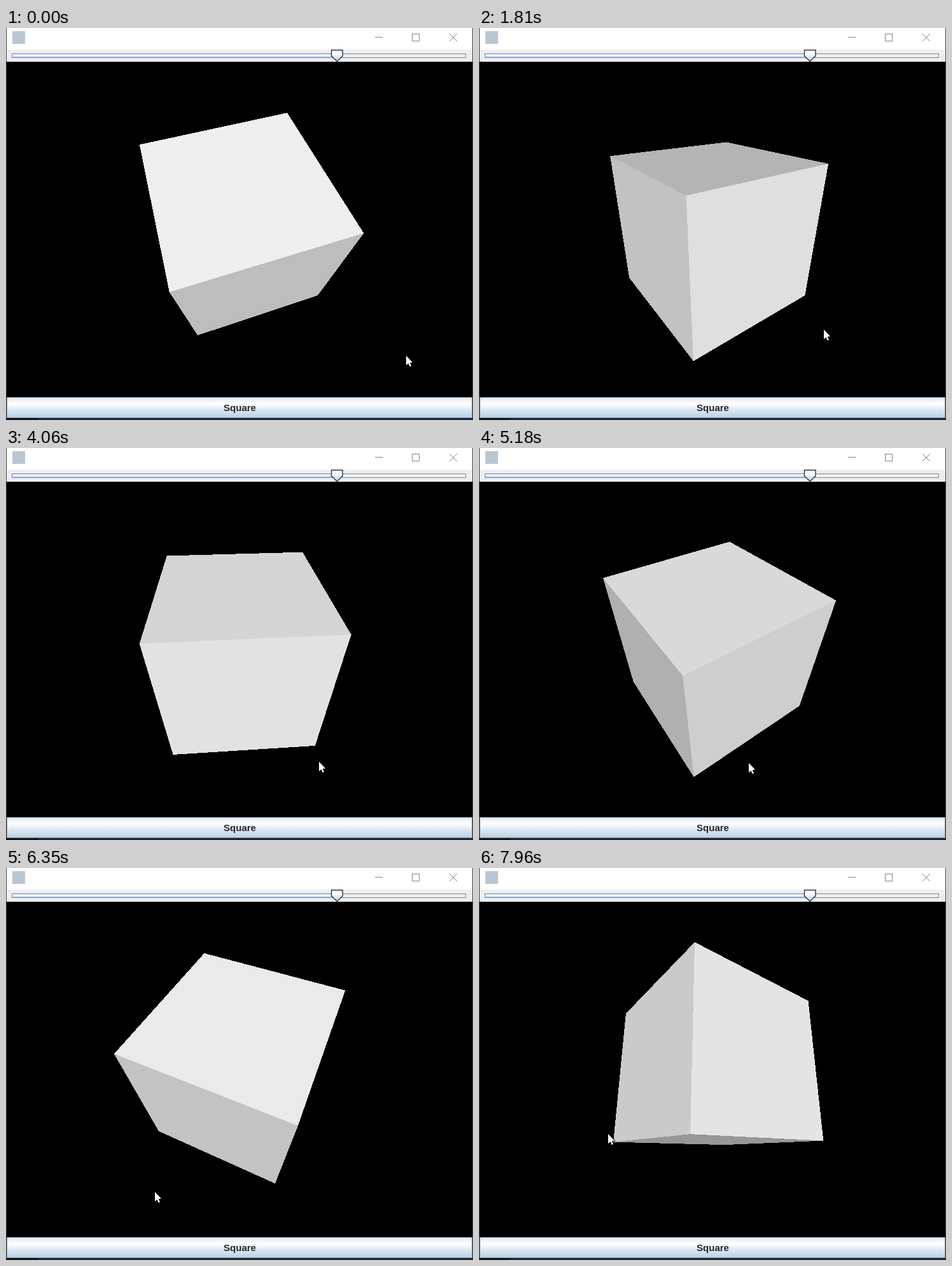
An HTML page with a canvas that plays this animation: 734x616 px, repeating every 8000 ms.

```html
<!DOCTYPE html>
<html lang="en">
<head>
<meta charset="utf-8">
<title>Cube viewer</title>
<style>
  html, body { margin: 0; width: 100%; height: 100%; overflow: hidden; background: #000; }
  canvas { display: block; width: 734px; height: 616px; }
</style>
</head>
<body>
<canvas id="stage" width="734" height="616"></canvas>
<script>
const ctx = document.getElementById('stage').getContext('2d');
const LOOP = 8000;
const CENTER = { x: 368, y: 317 };
const FOCAL = 446, DISTANCE = 4.08;
const LEAD = 50; // the pointer runs ahead of the cube by one redraw

// Turning points of the drag: time, yaw, pitch
const TURNS = [
  [50, 18, 59], [400, 23, 35], [840, 4, 13], [1480, -46, 50],
  [1710, -60, 31], [1810, -54.3, 26], [2910, 8, 16.3], [3320, -18, 38],
  [4060, -86, 41], [4620, -145.4, 43], [5180, -145.4, 43],
  [5960, -228, 55], [6350, -293.8, 54.5], [6840, -323, 36],
  [7420, -323, -14.5], [7930, -323, -14.5], [8010, -323, -21]
];
const LAST = TURNS.length - 1;

const slope = (i, c) => (TURNS[i + 1][c] - TURNS[i][c]) / (TURNS[i + 1][0] - TURNS[i][0]);

function tangent(i, c) {
  if (i === 0 || i === LAST) return 0;
  const a = slope(i - 1, c), b = slope(i, c);
  return a * b > 0 ? 2 * a * b / (a + b) : 0;
}

// Monotone cubic through the turning points
function angles(time) {
  const t = Math.min(Math.max(time, TURNS[0][0]), TURNS[LAST][0]);
  let i = 0;
  while (i < LAST - 1 && t >= TURNS[i + 1][0]) i++;
  const h = TURNS[i + 1][0] - TURNS[i][0], u = (t - TURNS[i][0]) / h, v = 1 - u;
  return [1, 2].map(c =>
    TURNS[i][c] * (1 + 2 * u) * v * v + TURNS[i + 1][c] * u * u * (3 - 2 * u)
    + h * u * v * (tangent(i, c) * v - tangent(i + 1, c) * u));
}

function rect(color, x, y, w, h) {
  ctx.fillStyle = color;
  ctx.fillRect(x, y, w, h);
}

function frame(color, x, y, w, h) {
  ctx.strokeStyle = color;
  ctx.lineWidth = 1;
  ctx.strokeRect(x + 0.5, y + 0.5, w - 1, h - 1);
}

function gloss(y0, y1) {
  const g = ctx.createLinearGradient(0, y0, 0, y1);
  g.addColorStop(0, '#dde8f3');
  g.addColorStop(0.3, '#fff');
  g.addColorStop(0.6, '#dde8f3');
  g.addColorStop(1, '#b8cfe5');
  return g;
}

function path(points, dx = 0, dy = 0) {
  ctx.beginPath();
  points.forEach(([x, y]) => ctx.lineTo(x + dx, y + dy));
  ctx.closePath();
}

function drawTitleBar() {
  rect('#fff', 0, 0, 734, 34);
  rect('#b9c6d3', 10, 5, 20, 20);
  rect('#858585', 580, 14, 12, 1);
  frame('#858585', 638, 9, 12, 12);
  ctx.beginPath();
  ctx.moveTo(697, 9); ctx.lineTo(709, 21);
  ctx.moveTo(709, 9); ctx.lineTo(697, 21);
  ctx.stroke();
}

function drawSlider() {
  rect('#eee', 0, 34, 734, 19);
  frame('#7a8a99', 9, 40, 714, 7);
  rect(gloss(41, 46), 10, 41, 510, 5);
  frame('#6382bf', 9, 40, 511, 7);
  path([[511.5, 34.5], [529, 34.5], [529, 44], [520.3, 52.5], [511.5, 44]]);
  ctx.fillStyle = gloss(35, 52);
  ctx.fill();
  ctx.lineWidth = 1.25;
  ctx.strokeStyle = '#222';
  ctx.stroke();
}

function drawButton() {
  rect(gloss(580, 613), 1, 580, 732, 33);
  frame('#7a8a99', 1, 580, 732, 33);
  rect('#1b2634', 0, 613, 734, 3);
  rect('#101318', 0, 613, 50, 3);
  ctx.fillStyle = '#262626';
  ctx.font = 'bold 15px "Liberation Sans", Arial, sans-serif';
  ctx.textAlign = 'center';
  ctx.fillText('Square', 367.5, 602);
}

// Fills a convex polygon with hard pixel edges
function fillHard(points, color) {
  const ys = points.map(p => p[1]);
  ctx.fillStyle = color;
  for (let y = Math.round(Math.min(...ys)); y < Math.round(Math.max(...ys)); y++) {
    const xs = [], mid = y + 0.5;
    points.forEach(([x0, y0], i) => {
      const [x1, y1] = points[(i + 1) % points.length];
      if ((y0 <= mid) !== (y1 <= mid)) xs.push(x0 + (x1 - x0) * (mid - y0) / (y1 - y0));
    });
    if (xs.length < 2) continue;
    const left = Math.round(Math.min(...xs));
    ctx.fillRect(left, y, Math.round(Math.max(...xs)) - left, 1);
  }
}

function drawCube([yaw, pitch]) {
  const a = yaw * Math.PI / 180, b = pitch * Math.PI / 180;
  const rotate = ([x, y, z]) => {
    const depth = z * Math.cos(a) - x * Math.sin(a);
    return [
      x * Math.cos(a) + z * Math.sin(a),
      y * Math.cos(b) - depth * Math.sin(b),
      depth * Math.cos(b) + y * Math.sin(b)
    ];
  };
  const project = point => {
    const [x, y, z] = rotate(point), scale = FOCAL / (DISTANCE - z);
    return [CENTER.x + x * scale, CENTER.y - y * scale];
  };
  for (let axis = 0; axis < 3; axis++) {
    for (const side of [-1, 1]) {
      const normal = [0, 0, 0];
      normal[axis] = side;
      const facing = rotate(normal)[2];
      if (facing * DISTANCE <= 1) continue;
      const corners = [[-1, -1], [1, -1], [1, 1], [-1, 1]].map(([u, v]) => {
        const p = [...normal];
        p[(axis + 1) % 3] = u;
        p[(axis + 2) % 3] = v;
        return project(p);
      });
      const shade = Math.floor(255 * Math.pow(facing, 1 / 2.4));
      fillHard(corners, `rgb(${shade},${shade},${shade})`);
    }
  }
}

const ARROW = [[0, 0], [0, 15], [3.4, 12], [5.7, 17], [8, 16], [5.8, 11], [10, 10.6]];

// The drag turns the cube 0.8 degrees per pixel
function drawPointer([yaw, pitch]) {
  path(ARROW, Math.round(606.5 + yaw / 0.8), Math.round(443.5 + pitch / 0.83));
  ctx.lineWidth = 1.6;
  ctx.strokeStyle = '#000';
  ctx.stroke();
  ctx.fillStyle = '#fff';
  ctx.fill();
}

function draw(t) {
  rect('#000', 0, 0, 734, 616);
  drawTitleBar();
  drawSlider();
  drawButton();
  rect('#3c3c3c', 0, 0, 1, 613);
  rect('#3c3c3c', 733, 0, 1, 613);
  drawCube(angles(t));
  drawPointer(angles(t + LEAD));
}

const start = performance.now();
function tick() {
  draw((performance.now() - start) % LOOP);
  requestAnimationFrame(tick);
}
tick();
</script>
</body>
</html>
```
